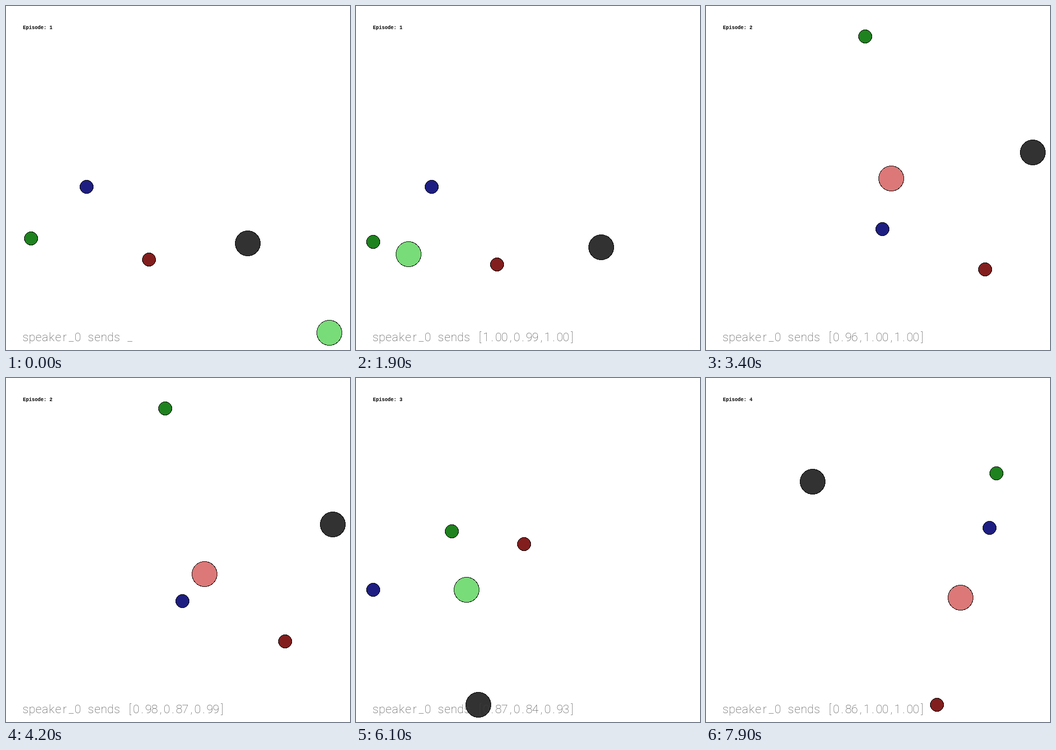
Recreate the animation shown at these times as an HTML page. Size 700 by 700 pixels, loop 8000 ms.

```html
<!DOCTYPE html>
<html lang="en">
<head>
<meta charset="utf-8">
<title>Speaker and listener</title>
<style>
  html, body { margin: 0; width: 100%; height: 100%; overflow: hidden; background: #fff; }
  svg { display: block; width: 100vw; height: 100vh; }
  circle { stroke: #000; stroke-width: 1; shape-rendering: crispEdges; }
  text { white-space: pre; }
  #label { font: bold 10px "Liberation Mono", monospace; }
  .say { font: 100 24px Roboto, Inter, sans-serif; fill: #444; text-anchor: middle; }
</style>
</head>
<body>
<svg viewBox="0 0 700 700">
  <circle id="speaker" r="25.5" fill="rgb(50,50,50)"/>
  <text class="say" id="intro" y="682"></text>
  <text class="say" id="message" y="682"></text>
  <circle id="listener" r="25.5"/>
  <circle id="red" r="13.5" fill="rgb(130,30,30)"/>
  <circle id="green" r="13.5" fill="rgb(30,130,30)"/>
  <circle id="blue" r="13.5" fill="rgb(30,30,130)"/>
  <text id="label" x="34.5" y="47"></text>
</svg>
<script>
const STEP = 100, LOOP = 80, EPISODE = 25, CENTRE = 350, REACH = 315;
const PALE_GREEN = 'rgb(120,220,120)', PALE_RED = 'rgb(220,120,120)';
const $ = id => document.getElementById(id);

// Positions are relative to the centre. The listener glides from start to rest;
// pace is its time scale in steps along x and y, bend the sharpness of the glide.
const episodes = [
  { tint: PALE_GREEN, start: [324.9, 332.3], rest: [-249, 155], pace: [9.64, 6.8], bend: 2.235,
    fixed: { speaker: [149.4, 140.6], red: [-62.6, 175.6], green: [-315, 130], blue: [-196, 18.48] } },
  { tint: PALE_RED, start: [-30, -155], rest: [59, 53], pace: [8.87, 7.34], bend: 1.6,
    fixed: { speaker: [315, -52], red: [218, 186], green: [-26, -288], blue: [9, 104] } },
  { tint: PALE_GREEN, start: [50, 225], rest: [-143, 62], pace: [7.14, 7.5], bend: 2,
    fixed: { speaker: [-101, 315], red: [-8, -12], green: [-155, -38], blue: [-315, 81] } },
  { tint: PALE_RED, start: [184, 34], rest: [150, 200], pace: [5.02, 5.79], bend: 2,
    fixed: { speaker: [-133, -139], red: [120, 315], green: [241, -156], blue: [227, -45] } }
];

function glide({ start, rest, pace, bend }, step) {
  return start.map((from, k) => rest[k] + (from - rest[k]) * Math.exp(-((step / pace[k]) ** bend)));
}

function random(seed) {
  const v = Math.sin(seed * 12.9898 + 4.1) * 43758.5453;
  return v - Math.floor(v);
}

function message(frame, step) {
  if (step === 0) return '_';
  const values = [0, 1, 2].map(k => Math.min(1, 0.84 + 0.3 * random(frame * 3 + k)));
  return '[' + values.map(v => v.toFixed(2)).join(',') + ']';
}

// Sets each character in the middle of an evenly spaced cell
function typeset(id, string, left, pitch) {
  $(id).setAttribute('x', [...string].map((_, i) => left + pitch * i).join(' '));
  $(id).textContent = string;
}

function draw(frame) {
  const index = Math.floor(frame / EPISODE), step = frame % EPISODE;
  const episode = episodes[index];
  const places = { ...episode.fixed, listener: glide(episode, step) };
  // The view zooms so that the outermost circle touches the margin
  const zoom = REACH / Math.max(...Object.values(places).flat().map(Math.abs));
  for (const [id, [x, y]] of Object.entries(places)) {
    $(id).setAttribute('cx', Math.round(CENTRE + x * zoom));
    $(id).setAttribute('cy', Math.round(CENTRE + y * zoom));
  }
  $('listener').setAttribute('fill', episode.tint);
  $('label').textContent = 'Episode: ' + (index + 1);
  typeset('message', message(frame, step), 252.3, 12.5);
}

typeset('intro', 'speaker_0 sends', 39.7, 13.3);

const began = performance.now();
let shown = -1;
function tick() {
  const frame = Math.floor((performance.now() - began) / STEP) % LOOP;
  if (frame !== shown) draw(shown = frame);
  requestAnimationFrame(tick);
}
tick();
</script>
</body>
</html>
```
